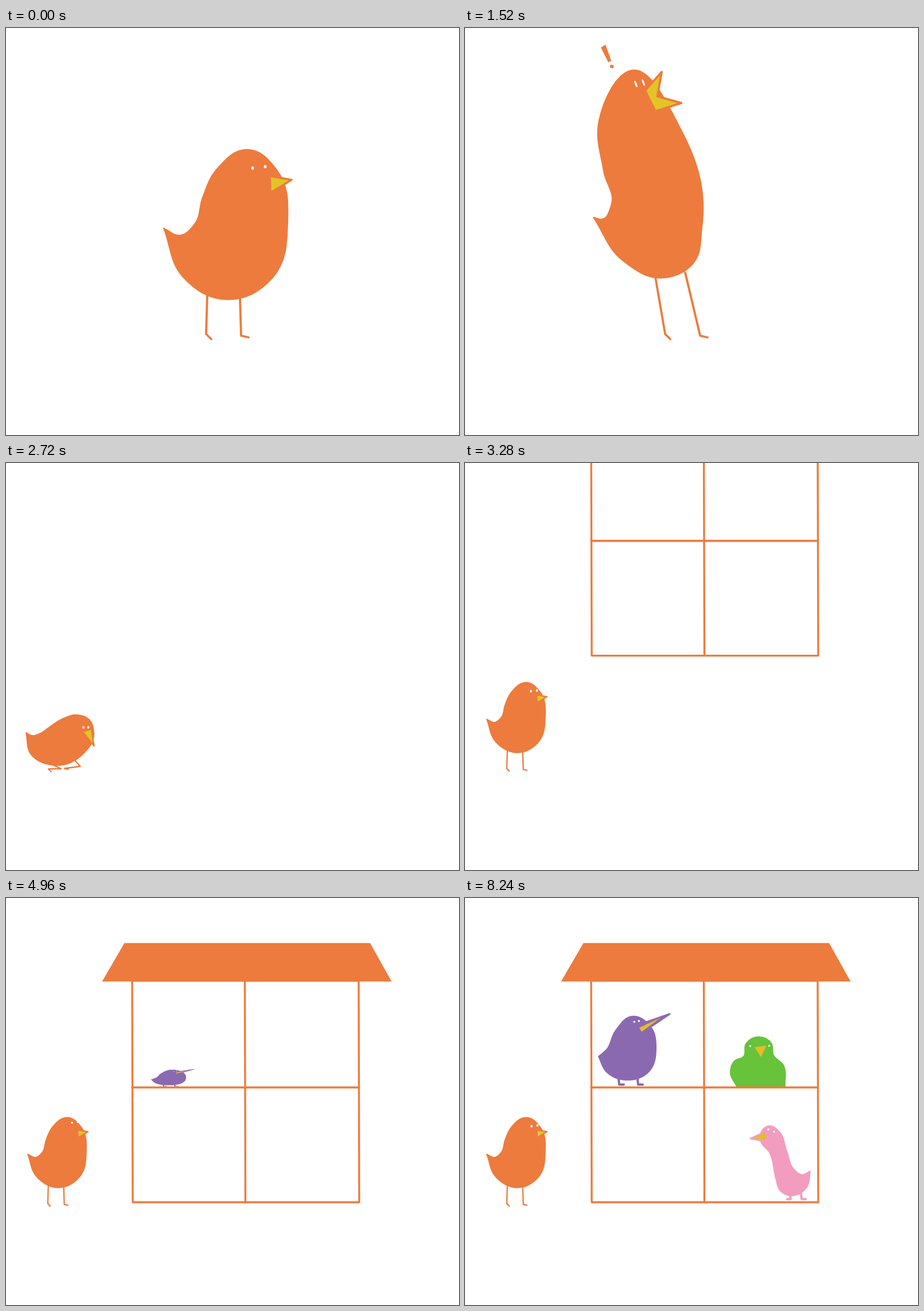
Recreate the animation shown at these times as an HTML page with a canvas. Size 790 px wide and 709 px high, loop 8320 ms.

```html
<!DOCTYPE html>
<html lang="en">
<head>
<meta charset="utf-8">
<title>Bird house</title>
<style>
  html, body { margin: 0; width: 100%; height: 100%; overflow: hidden; background: #fff; }
  canvas { display: block; }
</style>
</head>
<body>
<canvas id="stage" width="790" height="709"></canvas>
<script>
const ctx = document.getElementById('stage').getContext('2d');
const LOOP = 8320, STEP = 80;
const ORANGE = '#ed7b3d', YELLOW = '#e3c427', GOLD = '#e3bd2b';
ctx.lineCap = ctx.lineJoin = 'round';

const clamp = v => Math.max(0, Math.min(1, v));
const prog = (t, a, b) => clamp((t - a) / (b - a));
const mix = (a, b, p) => a.map((v, i) => v + (b[i] - v) * p);
const pairs = list => list.flatMap((v, i) => i % 2 ? [] : [[v, list[i + 1]]]);

function trace(points) {
  ctx.beginPath();
  pairs(points).forEach(p => ctx.lineTo(...p));
}
function line(points, width, color) {
  trace(points);
  ctx.lineWidth = width;
  ctx.strokeStyle = color;
  ctx.stroke();
}
function poly(points, fill) {
  trace(points);
  ctx.fillStyle = fill;
  ctx.fill();
}
function oval(x, y, rx, ry, tilt = 0, fill = '#fff') {
  ctx.beginPath();
  ctx.ellipse(x, y, rx, ry, tilt, 0, 7);
  ctx.fillStyle = fill;
  ctx.fill();
}

// Smooth outline through the points; the first and last stay a corner.
function blob(points, color) {
  const pts = pairs(points);
  const sides = pts.slice(1).map(([x, y], i) => {
    const dx = x - pts[i][0], dy = y - pts[i][1], len = Math.hypot(dx, dy) || 1;
    return { x: dx / len, y: dy / len, len };
  });
  const tangent = i => {
    const a = sides[i - 1] || sides[i], b = sides[i] || a;
    const x = a.x * b.len + b.x * a.len, y = a.y * b.len + b.y * a.len;
    const k = .37 * clamp(1 + a.x * b.x + a.y * b.y) / (Math.hypot(x, y) || 1);
    return [x * k, y * k];
  };
  ctx.beginPath();
  ctx.moveTo(...pts[0]);
  sides.forEach(({ len }, i) => {
    const [x1, y1] = pts[i], [x2, y2] = pts[i + 1];
    const [ax, ay] = tangent(i), [bx, by] = tangent(i + 1);
    ctx.bezierCurveTo(x1 + ax * len, y1 + ay * len, x2 - bx * len, y2 - by * len, x2, y2);
  });
  ctx.closePath();
  ctx.fillStyle = ctx.strokeStyle = color;
  ctx.lineWidth = 2;
  ctx.fill();
  ctx.stroke();
}

// shape: beak opening, knee bend, eye rx, eye ry, eye tilt, size
const rest = {
  body: [275,349, 304,361, 328,343, 343,295, 366,248, 424,212, 472,247, 491,340, 464,436, 385,473, 309,434, 275,349],
  beak: [460,258, 461,287, 498,264.5],
  hips: [351,463, 408,470],
  feet: [349,533, 410,536],
  eyes: [430,244, 452,241.5],
  shape: [0, 0, 2.4, 2.9, 0, 1]
};
const tall = {
  ...rest,
  body: [224,330, 239,333, 255,309, 242,250, 234,160, 289,74, 377,178, 413,348, 397,411, 348,435, 275,405, 224,330],
  beak: [314,109, 332,145, 369,98],
  hips: [332,434, 384,426],
  eyes: [298,97.5, 311,95],
  shape: [.63, 0, 1.7, 6, -.37, 1]
};
const lean = {
  body: [275,382, 274,400, 276,424, 238,345, 219,270, 256,189, 344,262, 383,400, 372,451, 334,468, 284,425, 275,382],
  beak: [304,229, 283,259, 372,326],
  hips: [346,467, 370,457],
  feet: [355,522, 411,522],
  eyes: [290,225, 300,222],
  shape: [0, 22, 0, 0, 0, 1]
};
const landed = {
  body: [35,470, 46,475, 60,471, 76,460, 98,446, 125,439, 145,447, 153,470, 133,508, 80,526, 44,508, 35,470],
  beak: [149,463, 134,468, 153.5,493],
  hips: [82,526, 121,519],
  feet: [74,533, 102,532],
  eyes: [135,460.5, 143.5,460.5],
  shape: [0, 18, 1.8, 2.3, 0, .5]
};

function resized(sx, sy, ox, oy, shape) {
  const pose = { shape };
  for (const part of ['body', 'beak', 'hips', 'feet', 'eyes'])
    pose[part] = rest[part].map((v, i) => i % 2 ? oy + v * sy : ox + v * sx);
  return pose;
}
const small = resized(.471, .467, -91.5, 283.5, [0, 0, 1.9, 2.3, 0, .47]);
const crouch = { ...resized(1.2, .8, -77, 108.6, rest.shape), feet: rest.feet };

const keys = [[0, rest], [80, rest], [480, crouch], [560, crouch], [880, tall], [1520, tall], [1920, rest],
  [2160, lean], [2720, landed], [2960, small], [LOOP, small]];

function drawBeak([x1, y1, x2, y2, tx, ty], open, width) {
  const cx = (x1 + x2) / 2, cy = (y1 + y2) / 2;
  const length = Math.hypot(tx - cx, ty - cy), angle = Math.atan2(ty - cy, tx - cx);
  const at = (turn, r) => [cx + r * Math.cos(angle + turn), cy + r * Math.sin(angle + turn)];
  const beak = [x1, y1, ...at(-open, length), ...at(0, length * (1 - 1.16 * open)), ...at(open, length), x2, y2, x1, y1];
  poly(beak, YELLOW);
  line(beak, width, ORANGE);
}

function drawHero(t) {
  const k = keys.findIndex(key => key[0] > t);
  const [t0, from] = keys[k - 1], [t1, to] = keys[k], pose = {};
  for (const part in from) pose[part] = mix(from[part], to[part], prog(t, t0, t1));
  const [open, bend, rx, ry, tilt, size] = pose.shape;
  const width = 1 + 2.8 * size, hips = pairs(pose.hips), feet = pairs(pose.feet);
  const toes = [[9, 9], [13, 3]];

  ctx.save();
  ctx.translate(0, -50 * Math.sin(Math.PI * prog(t, 2160, 2720)));
  hips.forEach(([x, y], i) => {
    const [fx, fy] = feet[i], [dx, dy] = toes[i];
    line([x, y, (x + fx) / 2 + bend, (y + fy) / 2 + bend / 6, fx, fy, fx + dx * size, fy + dy * size], width, ORANGE);
  });
  blob(pose.body, ORANGE);
  drawBeak(pose.beak, open, width);

  // Look toward the house, up at the new neighbours, then level again.
  const up = prog(t, 4880, 4960) - prog(t, 5760, 6160);
  const lid = t === 4160 ? .35 : 1 - .25 * up;
  ctx.translate(5 * prog(t, 2960, 3360) - up, -6 * up);
  pairs(pose.eyes).forEach(([x, y]) => oval(x, y, rx, ry * lid, tilt));
  ctx.restore();

  if (t >= 880 && t < 1600) {
    poly([237, 34, 245, 29, 255, 57, 250, 60], ORANGE);
    oval(256, 67, 3.4, 3, .3, ORANGE);
  }
}

// Three dashes shoot out, hold, then slide on and shrink away.
function burst(t, start, full, hold, end, { x, y, dx, dy, angle, turn, len, fade = 0 }) {
  if (t < start || t >= end) return;
  const out = prog(t, hold, end), tail = 2 * out, head = prog(t, start, full) + out;
  for (let i = 0; i < 3; i++) {
    const a = (angle + turn * i) * Math.PI / 180, reach = len - fade * i;
    const at = s => [x + dx * i + Math.cos(a) * reach * s, y + dy * i + Math.sin(a) * reach * s];
    line([...at(tail), ...at(head)], 3, ORANGE);
  }
}

const friends = [
  { color: '#8b69b1', base: [284, 329],
    body: [233,276, 247,264, 262,232, 294,206, 322,222, 333,262, 320,303, 282,317, 246,302, 233,276],
    bill: [314,217, 357,202, 326,223], beak: [304,226, 342,208, 308,233],
    legs: [[268, 8], [301, 8]],
    eyes: [298,218.5, 306,217], glance: -2.7,
    marks: [{ x: 241, y: 226, dx: 8, dy: -10, angle: -127, turn: 22, len: 26, fade: 2 },
      { x: 351, y: 242, dx: 10, dy: 24, angle: 39, turn: 9, len: 28, fade: 8 }] },
  { color: '#67c33a', base: [514, 329],
    body: [474,328, 463,305, 470,284, 486,276, 490,254, 514,242, 534,253, 538,274, 555,291, 558,328],
    bill: [], beak: [505,260, 526,257, 516,277], legs: [],
    eyes: [497.5,258, 530.5,257.5], glance: 0,
    marks: [{ x: 466, y: 250, dx: -10, dy: 9, angle: -135, turn: -28, len: 18, fade: 4 },
      { x: 557, y: 262, dx: 5.5, dy: 10, angle: -18, turn: 16, len: 13 }] },
  { color: '#f29dc0', base: [574, 528.5],
    body: [602,476, 596,504, 575,518, 550,510, 542,488, 531,443, 516,424, 518,405, 532,397, 547,406, 561,441, 573,472, 587,482, 602,476],
    bill: [498,419, 520,409, 521,423], beak: [502,418.5, 524,408, 524,421],
    legs: [[567, -6], [586, 7]],
    eyes: [529,403, 539,407], glance: 0,
    marks: [{ x: 571, y: 419, dx: 10, dy: 1, angle: -98, turn: 33, len: 14, fade: 4 },
      { x: 514, y: 469, dx: 2, dy: 14, angle: -130, turn: -33, len: 15 }] }
];

function drawFriend({ color, base: [x, y], body, bill, beak, legs, eyes, glance, marks }, index, t) {
  const start = 4880 + 80 * index, blink = 6640 + 560 * index;
  const p = prog(t, start, start + 400);
  if (!p) return;
  ctx.save();
  ctx.translate(x, y);
  ctx.scale(.5 + .5 * p, p + .35 * p * Math.sin(Math.PI * p));
  ctx.translate(-x, -y);
  legs.forEach(([lx, toe]) => line([lx, y - 13, lx + 1, y - 4, lx + 1 + toe, y - 4], 4, color));
  blob(body, color);
  poly(bill, color);
  line([...bill, ...bill.slice(0, 2)], 3, color);
  poly(beak, GOLD);
  const lid = t >= blink && t < blink + 160 ? .2 : 1, shift = t >= blink ? glance : 0;
  pairs(eyes).forEach(([ex, ey]) => oval(ex + shift, ey + shift, 1.8, 1.8 * lid));
  ctx.restore();
  marks.forEach(row => burst(t, start + 240, 5520, 5600, 6160, row));
}

function drawHouse(t) {
  const fall = prog(t, 2960, 3360), roof = prog(t, 4160, 4560);
  ctx.save();
  ctx.translate(0, -540 * (1 - fall * fall));
  line([220, 144, 615, 144, 616, 530, 221, 530, 220, 144], 3.4, ORANGE);
  line([416.5, 144, 417.5, 530], 3.4, ORANGE);
  line([220, 330, 615, 330], 3.6, ORANGE);
  ctx.restore();
  for (const side of [-1, 1])
    burst(t, 3360, 3440, 3440, 3680,
      { x: 418 + 223 * side, y: 170, dx: 4 * side, dy: 65, angle: -90 + 45 * side, turn: 27 * side, len: 55 });
  const drop = -150 * (1 - roof * roof);
  poly([206.5, 78.5 + drop, 635, 78.5 + drop, 672.5, 145.5 + drop, 167.5, 145.5 + drop], ORANGE);
}

function draw(t) {
  ctx.fillStyle = '#fff';
  ctx.fillRect(0, 0, 790, 709);
  friends.forEach((friend, i) => drawFriend(friend, i, t));
  drawHouse(t);
  drawHero(t);
}

const begin = performance.now();
function tick() {
  const t = (performance.now() - begin) % LOOP;
  draw(Math.floor(t / STEP) * STEP);
  requestAnimationFrame(tick);
}
tick();
</script>
</body>
</html>
```
